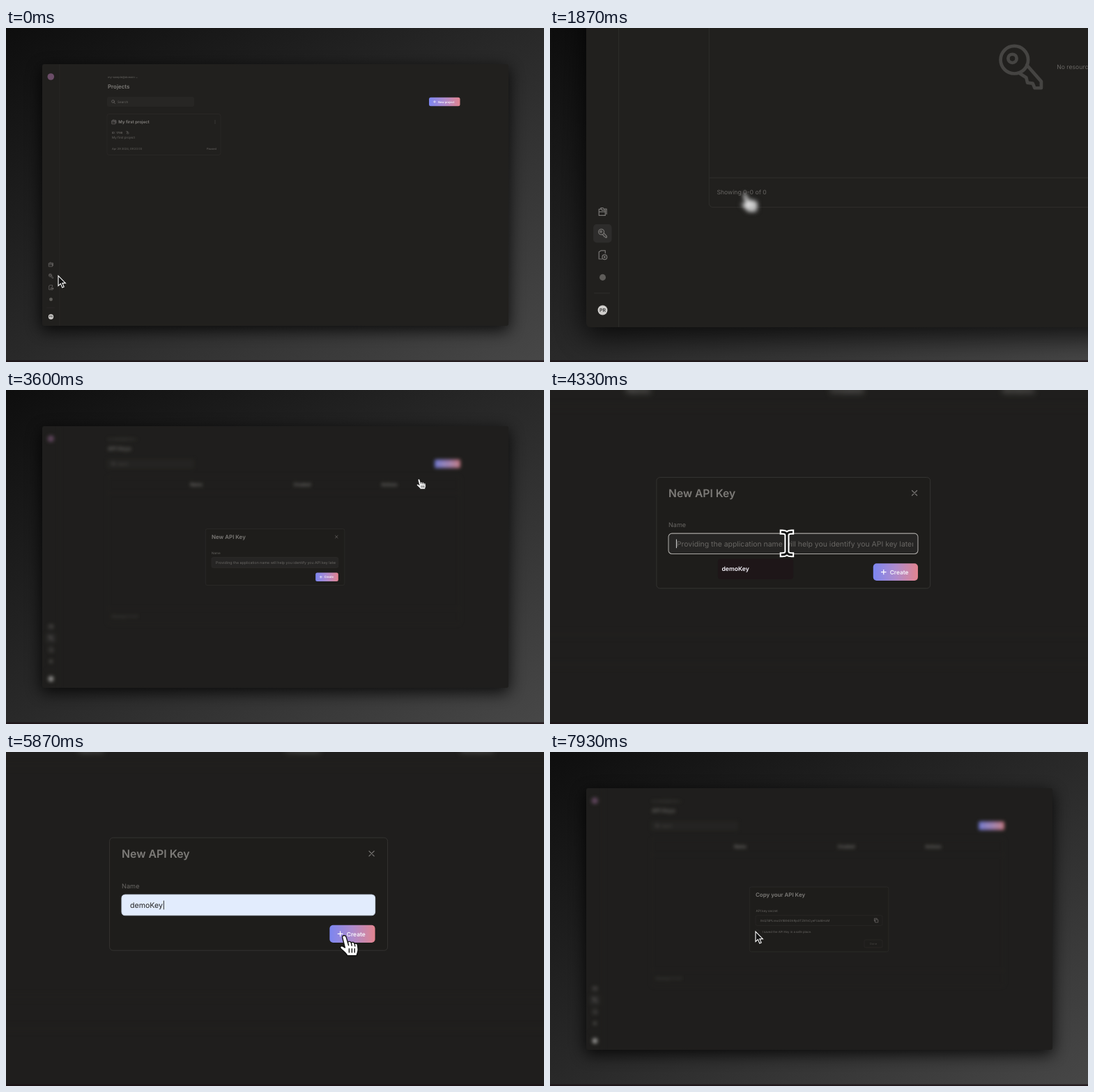
An HTML page that plays this animation: 772x480 px, repeating every 8 s.

```html
<!DOCTYPE html>
<html lang="en">
<head>
<meta charset="utf-8">
<title>Creating an API key</title>
<style>
  html, body { margin: 0; width: 100%; height: 100%; overflow: hidden; background: #111; }
  svg { display: block; width: 772px; height: 480px; }
  text { font-family: Inter, sans-serif; font-size: 4.6px; fill: #686663; text-rendering: geometricPrecision; }
  .title { font-size: 7.95px; font-weight: 600; fill: #7d7b78; }
  .small { font-size: 4px; }
  .bold { font-weight: 600; }
  .white { fill: #f6f4fb; font-weight: 600; }
  .column { font-size: 6.2px; font-weight: 700; fill: #93918e; text-anchor: middle; }
  .line { fill: none; stroke: #302f2d; stroke-width: .5; }
  .icon { fill: none; stroke: #777573; stroke-width: .65; stroke-linecap: round; stroke-linejoin: round; }
  .field { fill: #272624; }
  .panel { fill: #1e1d1b; stroke: #353432; stroke-width: .5; }
</style>
</head>
<body>
<svg viewBox="0 0 772 480">
  <defs>
    <linearGradient id="backdrop" x2="1" y2="1">
      <stop stop-color="#0e0e0e"/><stop offset=".5" stop-color="#292929"/><stop offset="1" stop-color="#474747"/>
    </linearGradient>
    <linearGradient id="accent">
      <stop stop-color="#7c86f0"/><stop offset=".5" stop-color="#ae8bcd"/><stop offset="1" stop-color="#e2848f"/>
    </linearGradient>
    <filter id="soft" x="-10%" y="-15%" width="120%" height="130%"><feGaussianBlur stdDeviation="11"/></filter>
    <clipPath id="windowClip"><rect x="52" y="52" width="669" height="376" rx="3"/></clipPath>
    <clipPath id="fieldClip"><rect x="296" y="240" width="177.3" height="16"/></clipPath>
    <g id="key">
      <circle cx="-1" cy="-1.2" r="2.1"/><circle cx="-1.3" cy="-1.4" r=".65"/>
      <path d="M.9-.4L3.1 2.1V3.1H2.1L1.8 2.4 1 2.3 .8 1.5-.3 .8"/>
    </g>
    <path id="folder" d="M-2.8-2H-1L-.2-1.2H2V2.8H-2.8ZM-1.4-2V-3H.3L1-2.2H3V1.7M-2.8 0H2"/>
    <path id="plus" d="M-1.9 0H1.9M0-1.9V1.9" fill="none" stroke="#fff" stroke-width=".6"/>
    <path id="beamShape" d="M-3.4-8.3C-1.2-8.3 0-7.5 0-6V6C0 7.5-1.2 8.3-3.4 8.3M3.4-8.3C1.2-8.3 0-7.5 0-6M0 6C0 7.5 1.2 8.3 3.4 8.3"/>
    <g id="header">
      <text x="146" y="72" class="small">my-sample@domain ⌄</text>
      <rect class="field" x="145" y="99" width="125" height="14" rx="2.5"/>
      <circle class="icon" cx="153.6" cy="105.5" r="1.9"/><path class="icon" d="M155 107L156.5 108.5"/>
      <text x="160" y="108">Search</text>
    </g>
  </defs>

  <rect width="772" height="480" fill="url(#backdrop)"/>

  <g id="camera">
    <rect x="50" y="57" width="672" height="378" rx="6" opacity=".78" filter="url(#soft)"/>
    <rect x="52" y="52" width="669" height="376" rx="3" fill="#21201e"/>
    <g clip-path="url(#windowClip)">
      <g id="page">
        <path class="line" d="M76.8 52V428M58 402H70"/>
        <circle cx="64.3" cy="70" r="4.8" fill="#6b4d68"/>
        <rect id="active" x="57.4" y="349.5" width="14" height="14" rx="2.5" fill="#2d2c2b"/>
        <g class="icon">
          <use href="#folder" x="64.5" y="340"/>
          <use href="#key" x="64.5" y="356.5"/>
          <path d="M64 376H61.7V370.6L63.2 369.6H66.5V371.5"/><circle cx="66" cy="374.5" r="1.8"/><circle cx="66" cy="374.5" r=".4"/>
        </g>
        <circle cx="64.5" cy="390" r="2.4" fill="#5f5d5a"/>
        <circle cx="64.5" cy="415" r="3.7" fill="#d0cecc"/>
        <text x="64.5" y="416.4" class="bold" text-anchor="middle" style="font-size:3.7px;fill:#333">PR</text>

        <g id="projects">
          <use href="#header"/>
          <text x="146" y="87" class="title">Projects</text>
          <rect x="607" y="99.7" width="44.5" height="12.6" rx="2.5" fill="url(#accent)"/>
          <use href="#plus" x="615" y="106"/>
          <text x="620" y="107.5" class="white small">New project</text>
          <rect class="line" x="145" y="123.5" width="163" height="59" rx="3"/>
          <use href="#folder" class="icon" x="155" y="135"/>
          <text x="161.3" y="137.2" class="bold" style="font-size:6px;fill:#85827f">My first project</text>
          <path class="icon" d="M300 133V133M300 135V135M300 137V137"/>
          <text x="152" y="151.7" class="small bold">ID: 1798</text>
          <path class="icon" d="M172.5 148.5H174.5V150.5M173.8 149.8H176V152H173.8Z" style="stroke-width:.4"/>
          <text x="152" y="159.3">My first project</text>
          <text x="152" y="174.6" class="small">Apr 29 2024, 09:23:03</text>
          <text x="288" y="174.6" class="small">Paused</text>
        </g>

        <g id="keys">
          <use href="#header"/>
          <text x="146" y="87" class="title">API Keys</text>
          <rect x="615" y="99.7" width="37" height="12.6" rx="2.5" fill="url(#accent)"/>
          <use href="#plus" x="621" y="106"/>
          <text x="625" y="107.5" class="white small">New API key</text>
          <rect class="line" x="145.6" y="124" width="506" height="212.5" rx="3"/>
          <path class="line" d="M145.6 148H651.6M145.6 314H651.6"/>
          <text x="273" y="138" class="column">Name</text>
          <text x="425" y="138" class="column">Created</text>
          <text x="550" y="138" class="column">Actions</text>
          <use href="#key" class="icon" transform="translate(383.2 230) scale(5)" style="stroke:#454442;stroke-width:.5"/>
          <text x="410.5" y="231.3">No resources found</text>
          <text x="151.5" y="326.7">Showing 0-0 of 0</text>
        </g>
      </g>

      <rect id="shade" x="52" y="52" width="669" height="376" fill="#171717" opacity="0"/>

      <g id="createDialog">
        <rect class="panel" x="286.3" y="199.6" width="199.5" height="81" rx="2.5"/>
        <text x="295" y="214.2" class="title">New API Key</text>
        <path class="icon" d="M472.5 209.2L476.1 212.8M476.1 209.2L472.5 212.8"/>
        <text x="295" y="235.9">Name</text>
        <rect id="nameField" x="295" y="240.5" width="181.8" height="14.9" rx="2.5" stroke-width=".55"/>
        <text id="hint" x="301" y="249.9" clip-path="url(#fieldClip)" style="font-size:5.3px">Providing the application name will help you identify you API key later</text>
        <text id="value" x="301" y="249.9" style="font-size:5.3px;fill:#222">demoKey</text>
        <path id="caret" d="M0 244.8V251.2" stroke-width=".5"/>
        <rect x="444.2" y="262.4" width="32.6" height="12.6" rx="2.5" fill="url(#accent)"/>
        <use href="#plus" x="451.8" y="268.7"/>
        <text x="456.4" y="270.3" class="white" style="font-size:4.2px">Create</text>
        <g id="suggestion">
          <rect x="331" y="259" width="55" height="15" rx="2" fill="#1e1618"/>
          <text x="333.8" y="268" class="white" style="font-size:4.4px">demoKey</text>
        </g>
      </g>

      <g id="copyDialog">
        <rect class="panel" x="286.3" y="194" width="199.5" height="93" rx="2.5"/>
        <text x="295" y="208.3" class="title">Copy your API Key</text>
        <text x="295.6" y="229.9">API key secret</text>
        <rect class="line" x="295" y="234.8" width="182" height="14.6" rx="2.5"/>
        <text x="301.5" y="243.6" style="font-size:4.4px">XkQ7dPLmw2VtB94GhRjs0TZ61nCyeFUa8iHoM</text>
        <path class="icon" d="M466 243H465.4V239.2H469.2V240M467 241H470.8V244.8H467Z"/>
        <rect class="line" x="295.2" y="255.8" width="4.6" height="4.6" rx=".8"/>
        <text x="304.5" y="259.6" style="font-size:4.3px">I saved the API Key in a safe place.</text>
        <rect class="line" x="451" y="270" width="26" height="11" rx="2"/>
        <text x="464" y="277" class="small" text-anchor="middle" style="fill:#484744">Done</text>
      </g>
    </g>

    <g id="cursor">
      <path id="arrow" d="M0 0V14.5L3.4 11.4 5.8 17 8.2 16 5.9 10.6H10.4Z" fill="#111" stroke="#fff" stroke-width="1.1"/>
      <g id="hand" stroke="#111" stroke-width=".7" stroke-linecap="round" stroke-linejoin="round">
        <path fill="#fff" d="M-1.6 1.4C-2.1-.2 .4-.8 1 .8L2.2 4.6C3 3.9 4.4 4.1 4.7 5.1 5.5 4.3 6.9 4.7 7.1 5.7 8.2 5.2 9.2 5.9 9.3 7L9.6 10C9.6 12 8.7 12.8 8.6 14.3H1.8C1.5 12.9-.9 11.2-2.7 9.4-4 8-2.6 6.9-1.2 7.7L.2 8.6Z"/>
        <path d="M2.2 4.6L2.8 6.9M4.7 5.1L5.1 7.2M7.1 5.7L7.4 7.5M3.2 9.4V12M5.2 9.4V12M7.1 9.4V12" fill="none"/>
      </g>
      <g id="beam" fill="none" stroke-linecap="square">
        <use href="#beamShape" stroke="#fff" stroke-width="3.6"/>
        <use href="#beamShape" stroke="#111" stroke-width="1.5"/>
      </g>
    </g>
  </g>
  <rect y="477.5" width="772" height="2.5" fill="#1d1216" opacity=".75"/>
</svg>

<script>
const LOOP = 8000;
const PAGE_SWITCH = 1000, OPEN = 3000, FOCUS = 4180, FILL = 4950, CREATED = 6030;

const $ = id => document.getElementById(id);
const clamp = v => Math.max(0, Math.min(1, v));
const ramp = (t, start, length) => clamp((t - start) / length);
const smooth = u => u * u * (3 - 2 * u);

// Critically damped spring, 0 to 1
const spring = (t, start) => {
  const y = Math.max(0, t - start) * 0.008;
  return 1 - (1 + y) * Math.exp(-y);
};

const zooms = [
  { x: 52, y: 425.8, start: 130, end: 1798 },
  { x: 424, y: 276, start: 3667, end: 6338 },
];

// The bend exponent curves the vertical part of a path
const moves = [
  { start: 60, end: 400, x: 66, y: 357 },
  { start: 1648, end: 2448, x: 630, y: 107, bend: 1.25 },
  { start: 3430, end: 4130, x: 381.3, y: 247.8 },
  { start: 4500, end: 4850, x: 350, y: 267 },
  { start: 5150, end: 5650, x: 455, y: 270 },
  { start: 6950, end: 7650, x: 295, y: 258 },
];

const pointers = [[0, 'arrow'], [330, 'hand'], [3950, 'beam'], [4650, 'arrow'], [5500, 'hand'], [7030, 'arrow']];

function show(id, visible) {
  $(id).style.display = visible ? '' : 'none';
}

function fade(id, opacity) {
  show(id, opacity > 0);
  $(id).style.opacity = opacity;
}

function cursorAt(t) {
  let x = 75, y = 356;
  for (const m of moves) {
    const u = smooth(ramp(t, m.start, m.end - m.start));
    x += (m.x - x) * u;
    y += (m.y - y) * u ** (m.bend || 1);
  }
  return [x, y];
}

function drawCamera(t) {
  const zoom = t < 3300 ? zooms[0] : zooms[1];
  const scale = 1 + spring(t, zoom.start) - spring(t, zoom.end);
  $('camera').setAttribute('transform',
    `translate(${zoom.x * (1 - scale)} ${zoom.y * (1 - scale)}) scale(${scale})`);
}

function drawCursor(t) {
  const [x, y] = cursorAt(t);
  const [px, py] = cursorAt(t - 10);
  const speed = Math.hypot(x - px, y - py) / 10;
  const blur = Math.min(2, Math.max(0, speed - 0.45) * 4);
  $('cursor').setAttribute('transform', `translate(${x} ${y})`);
  $('cursor').style.filter = blur > 0.05 ? `blur(${blur}px)` : 'none';
  const kind = pointers.filter(([start]) => t >= start).pop()[1];
  for (const id of ['arrow', 'hand', 'beam']) show(id, id === kind);
}

function drawPage(t) {
  const onKeys = t >= PAGE_SWITCH;
  show('projects', !onKeys);
  show('keys', onKeys);
  show('active', onKeys);
  const dim = ramp(t, OPEN, 200);
  $('page').style.filter = dim ? `blur(${2.5 * dim}px)` : 'none';
  $('shade').setAttribute('opacity', 0.18 * dim);
}

function drawDialogs(t) {
  fade('createDialog', ramp(t, OPEN, 200) * (1 - ramp(t, CREATED, 120)));
  fade('copyDialog', ramp(t, CREATED, 160));
  const focused = t >= FOCUS, filled = t >= FILL;
  const field = $('nameField');
  field.setAttribute('fill', filled ? '#e2ecfd' : '#262524');
  field.setAttribute('stroke', filled ? '#cbd6e8' : focused ? '#a9a7a4' : '#302f2d');
  show('hint', !filled);
  show('value', filled);
  show('suggestion', focused && !filled);
  show('caret', focused && (t - FOCUS) % 1060 < 640);
  $('caret').setAttribute('transform', `translate(${filled ? 325.2 : 300.8} 0)`);
  $('caret').setAttribute('stroke', filled ? '#333' : '#ddd');
}

const origin = performance.now();

function tick() {
  const t = (performance.now() - origin) % LOOP;
  drawCamera(t);
  drawPage(t);
  drawDialogs(t);
  drawCursor(t);
  requestAnimationFrame(tick);
}
tick();
</script>
</body>
</html>
```
